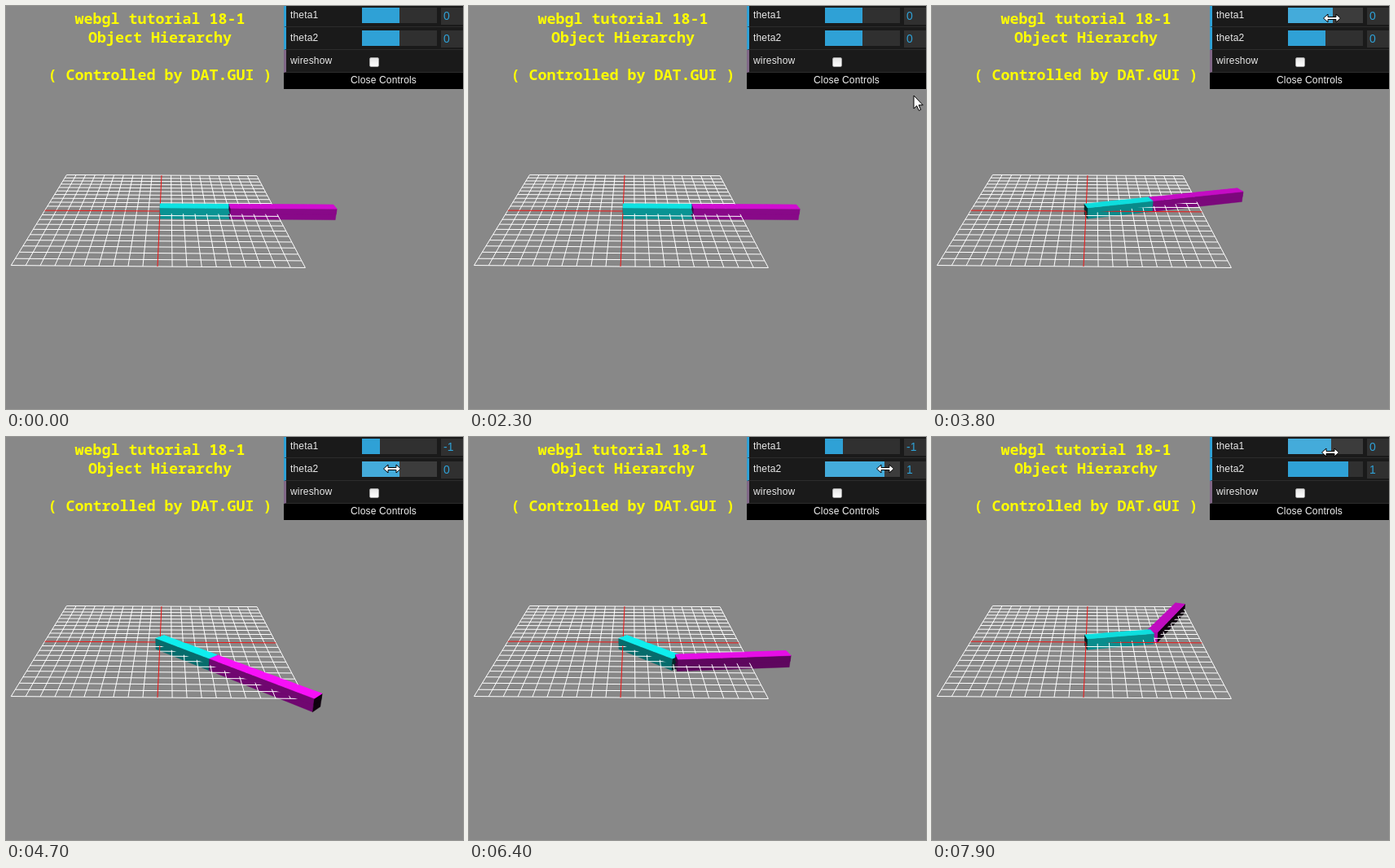
Recreate the animation shown at these times as an HTML page with a canvas. Size 561 px wide and 495 px high, loop 8 s.

```html
<!DOCTYPE html>
<html lang="en">
<head>
<meta charset="utf-8">
<title>Object Hierarchy</title>
<style>
  html, body { margin: 0; width: 561px; height: 495px; overflow: hidden; background: #888; }
  body { position: relative; }
  canvas, .cursor { position: absolute; left: 0; top: 0; }
  h1 {
    position: absolute; left: 0; top: 3px; width: 378px; margin: 0;
    font: bold 18.33px/23px "Noto Sans Mono", monospace;
    color: #ff0; text-align: center; white-space: pre;
  }
  .gui {
    position: absolute; left: 341px; top: -2px; width: 220px;
    font: 12px/27px "Liberation Sans", Arial, sans-serif;
    letter-spacing: .17px; color: #eee; text-shadow: 0 -1px 0 #111;
  }
  .row {
    position: relative; box-sizing: border-box; height: 28px; padding-left: 5px;
    background: #1a1a1a; border-left: 3px solid #2fa1d6; border-bottom: 1px solid #2c2c2c;
  }
  .bool { border-left-color: #806787; }
  .slider { position: absolute; left: 93px; top: 4px; width: 92px; height: 19px; background: #303030; }
  .fill { height: 100%; background: #2fa1d6; }
  .hover { background: #3c3c3c; }
  .hover .fill { background: #44abda; }
  .num {
    position: absolute; left: 190px; top: 4px; width: 24px; height: 21px; padding-left: 3px;
    background: #303030; color: #2fa1d6; font-size: 14px; line-height: 21px; text-shadow: none;
  }
  .check {
    position: absolute; left: 102px; top: 9px; width: 10px; height: 10px;
    border: 1px solid #a0a0a0; border-radius: 2px; background: linear-gradient(#e4e4e4, #fff);
  }
  .close { height: 20px; line-height: 18px; background: #000; text-align: center; padding-right: 0; width: 245px; }
  .cursor { overflow: visible; fill: #fff; stroke: #000; stroke-width: 1; }
</style>
</head>
<body>
<canvas width="561" height="495"></canvas>
<h1>webgl tutorial 18-1
Object Hierarchy

( Controlled by DAT.GUI )</h1>
<div class="gui">
  <div class="row">theta1<div class="slider"><div class="fill"></div></div><div class="num">0</div></div>
  <div class="row">theta2<div class="slider"><div class="fill"></div></div><div class="num">0</div></div>
  <div class="row bool">wireshow<div class="check"></div></div>
  <div class="close">Close Controls</div>
</div>
<svg class="cursor" width="1" height="1">
  <path id="arrow" d="M0 0V16L3.7 12.6L6.2 18.4L8.6 17.4L6.1 11.7H11.2Z"/>
  <path id="resize" d="M-10.5 0L-5 -5V-1.5H5V-5L10.5 0L5 5V1.5H-5V5Z"/>
</svg>
<script>
const $$ = s => [...document.querySelectorAll(s)];
const ctx = $$('canvas')[0].getContext('2d');
const sliders = $$('.slider'), fills = $$('.fill'), nums = $$('.num');
const cursor = $$('.cursor')[0], [arrow, resize] = $$('.cursor path');

// Camera: focal length, distance, pitch and yaw; the grid spans -1..1
const F = 613, DIST = 4.32, PITCH = 0.386, YAW = 0.0166;
const sinP = Math.sin(PITCH), cosP = Math.cos(PITCH);
const sinY = Math.sin(YAW), cosY = Math.cos(YAW);
const HALF = 0.05, RANGE = 1.5, LOOP = 8000, STEP = 100;
const LIGHT = [0, 2, 1.33];

const theta1Keys = [[2800, 0], [2900, -.1], [3400, .95], [3500, .95], [3800, .29],
  [4200, -.78], [7200, -.78], [7900, .23]];
const theta2Keys = [[4700, 0], [5300, -.45], [5600, -.83], [5700, -.83], [6400, .88], [6500, .91]];
const mouseKeys = [[300, 547, 57], [600, 36, 130], [700, 72, 142], [1000, 72, 142],
  [1500, 505, 110], [1700, 517, 150], [1900, 340, 249], [2300, 546, 110], [2700, 482, 14],
  [2900, 480, 14], [3400, 512, 14], [3500, 512, 14], [3800, 491, 15], [4200, 459, 15],
  [4300, 463, 39], [4400, 463, 39], [4700, 474, 39], [4800, 483, 39], [5300, 469, 39],
  [5600, 458, 39], [5700, 458, 39], [6400, 511, 39], [6600, 511, 39], [7100, 459, 15],
  [7200, 459, 15], [7900, 489, 19]];

function track(keys, t, i = 1) {
  const n = keys.findIndex(k => k[0] >= t);
  if (n === 0) return keys[0][i];
  if (n < 0) return keys[keys.length - 1][i];
  const a = keys[n - 1], b = keys[n];
  return a[i] + (b[i] - a[i]) * (t - a[0]) / (b[0] - a[0]);
}

function project([x, y, z]) {
  const u = x * cosY - z * sinY, v = z * cosY + x * sinY;
  const w = DIST - v * cosP - y * sinP;
  return [189 + F * u / w, 252 + F * (v * sinP - y * cosP) / w];
}

function line(a, b, color) {
  ctx.strokeStyle = color;
  ctx.beginPath();
  ctx.moveTo(...project(a));
  ctx.lineTo(...project(b));
  ctx.stroke();
}

function drawGrid() {
  ctx.lineWidth = 1;
  for (let i = -10; i <= 10; i++) {
    const p = i / 10;
    if (!i) continue;
    line([p, 0, -1], [p, 0, 1], '#fff');
    line([-1, 0, p], [1, 0, p], '#fff');
  }
  line([-1, 0, 0], [1, 0, 0], '#f01414');
  line([0, 0, -1], [0, 0, 1], '#f01414');
}

function shade(center, normal, rgb) {
  const ray = LIGHT.map((v, i) => v - center[i]);
  const dot = ray.reduce((s, v, i) => s + v * normal[i], 0);
  const k = Math.min(1, Math.max(.06, 1.08 * dot / Math.hypot(...ray)));
  return `rgb(${rgb.map(v => Math.round(v * k))})`;
}

function drawArm({ x, z, angle, len, rgb }, bottom) {
  const c = Math.cos(angle), s = Math.sin(angle), h = HALF;
  const at = (l, y, d) => [x + l * c + d * s, y, z - l * s + d * c];
  const side = (l0, d0, l1, d1) => [at(l0, h, d0), at(l1, h, d1), at(l1, bottom, d1), at(l0, bottom, d0)];
  const faces = [
    [side(0, h, len, h), at(len / 2, 0, h), [s, 0, c]],
    [side(len, -h, 0, -h), at(len / 2, 0, -h), [-s, 0, -c]],
    [side(len, h, len, -h), at(len, 0, 0), [c, 0, -s]],
    [side(0, -h, 0, h), at(0, 0, 0), [-c, 0, s]],
    [[at(0, h, -h), at(len, h, -h), at(len, h, h), at(0, h, h)], at(len / 2, h, 0), [0, 1, 0]]
  ];
  ctx.lineWidth = .4;
  for (const [quad, center, normal] of faces) {
    const [p, q, r, o] = quad.map(project);
    if ((q[0] - p[0]) * (r[1] - p[1]) - (q[1] - p[1]) * (r[0] - p[0]) <= 0) continue;
    ctx.fillStyle = ctx.strokeStyle = shade(center, normal, rgb);
    ctx.beginPath();
    for (const v of [p, q, r, o]) ctx.lineTo(...v);
    ctx.closePath();
    ctx.fill();
    ctx.stroke();
  }
}

function drawScene(t1, t2) {
  const upper = { x: 0, z: 0, angle: t1, len: .6, rgb: [16, 255, 255] };
  const lower = { x: .6 * Math.cos(t1), z: -.6 * Math.sin(t1), angle: t1 + t2, len: .9, rgb: [255, 16, 255] };
  const depth = a => a.z - a.len / 2 * Math.sin(a.angle);
  const arms = [upper, lower].sort((a, b) => depth(a) - depth(b));
  ctx.clearRect(0, 0, 561, 495);
  // The grid plane cuts the arms in half: only the top halves cover it
  arms.forEach(a => drawArm(a, -HALF));
  drawGrid();
  arms.forEach(a => drawArm(a, 0));
}

function render(t) {
  const thetas = [track(theta1Keys, t), track(theta2Keys, t)];
  const mx = track(mouseKeys, t, 1), my = track(mouseKeys, t, 2);
  drawScene(...thetas);
  let over = false;
  thetas.forEach((v, i) => {
    const top = 2 + 28 * i;
    const hit = t >= 300 && mx >= 437 && mx < 529 && my >= top && my < top + 19;
    over = over || hit;
    sliders[i].classList.toggle('hover', hit);
    fills[i].style.width = Math.round(46 + v / RANGE * 46) + 'px';
    nums[i].textContent = String(Math.round(v) || 0);
  });
  cursor.style.visibility = t < 300 ? 'hidden' : 'visible';
  cursor.style.transform = `translate(${mx}px, ${my}px)`;
  arrow.style.display = over ? 'none' : '';
  resize.style.display = over ? '' : 'none';
}

const start = performance.now();
function tick(now) {
  const t = Math.max(0, now - start) % LOOP;
  render(Math.floor(t / STEP) * STEP);
  requestAnimationFrame(tick);
}
render(0);
requestAnimationFrame(tick);
</script>
</body>
</html>
```
